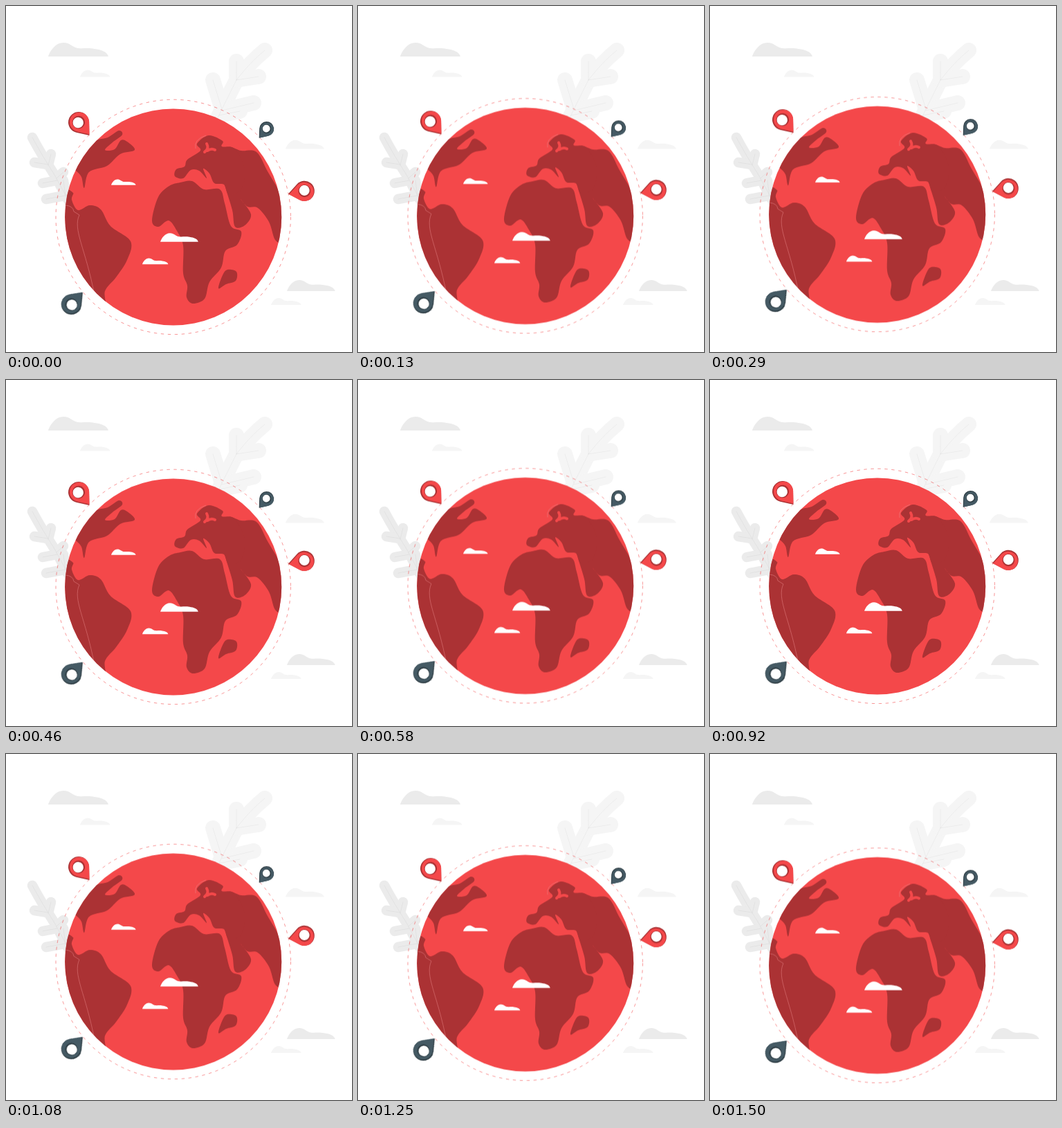
Recreate the animation shown at these times as an HTML page. Size 500 by 500 pixels, loop 1.54 s.

```html
<!DOCTYPE html>
<html lang="en">
<head>
<meta charset="utf-8">
<title>Floating globe</title>
<style>
  html, body { margin: 0; width: 100%; height: 100%; overflow: hidden; background: #fff; }
  svg { display: block; width: 100%; height: 100%; }
  .float { animation: float 1540ms -46ms infinite; }
  /* 19 stepped positions up, 18 down */
  @keyframes float {
    0% { transform: translateY(.54px); animation-timing-function: steps(19); }
    51.35% { transform: translateY(-9.73px); animation-timing-function: steps(1); }
    51.352% { transform: translateY(-9.19px); animation-timing-function: steps(18); }
    100% { transform: translateY(.54px); }
  }
  .red { --main: #f4484a; --shade: #ab3234; }
  .slate { --main: #455a64; --shade: #303f46; }
  .pale { --tint: #f5f5f5; fill: var(--tint); }
  .grey { --tint: #ebebeb; fill: var(--tint); }
  .leaf path { fill: none; stroke: var(--tint); stroke-linecap: round; stroke-linejoin: round; }
  .leaf .vein { stroke: #000; stroke-opacity: .06; stroke-width: .7; }
  .land { fill: #ab3234; }
  .sea { fill: none; stroke: #f4484a; stroke-width: 4; stroke-linecap: round; }
  .coast { fill: none; stroke: #e8898a; stroke-width: .5; }
</style>
</head>
<body>
<svg viewBox="0 0 500 500">
  <defs>
    <path id="cloud" d="M0 0C3-9 11-20 22-20C32-20 35-13 43-12C51-11 57-13 67-11C77-9.500 85-7 87 0Z"/>
    <path id="drop" d="M24.500 0L9.200 11.900A15 15 0 1 1 9.200-11.900Z"/>
    <g id="pin">
      <use href="#drop" fill="var(--shade)"/>
      <use href="#drop" fill="var(--main)" transform="translate(.4 -1) scale(.94)"/>
      <circle r="9.200" fill="var(--shade)"/>
      <circle cy=".9" r="7.700" fill="#fff"/>
    </g>
    <circle id="ball" cx="241.700" cy="304.900" r="156.500"/>
    <clipPath id="disc"><use href="#ball"/></clipPath>
  </defs>

  <use href="#cloud" class="grey" transform="translate(61 73)"/>
  <use href="#cloud" class="pale" transform="translate(107 102.500) scale(.5)"/>
  <use href="#cloud" class="pale" transform="translate(404 206.500) scale(.64)"/>
  <use href="#cloud" class="grey" transform="translate(406 412) scale(.8)"/>
  <use href="#cloud" class="pale" transform="translate(383 432) scale(.5)"/>

  <g id="oak" class="leaf pale"></g>
  <g id="fern" class="leaf grey"></g>

  <g class="float">
    <circle cx="241.700" cy="304.900" r="169.700" fill="none" stroke="#f4484a" stroke-width=".6" stroke-dasharray="4.400 5.600"/>
    <use href="#ball" fill="#f4484a"/>
    <g clip-path="url(#disc)">
      <!-- Americas -->
      <path class="land" data-pts="126,197 147,190 163,180 168,186 154,197 143,208 157,207 166,194 175,196 186,208 165,214 146,231 120,240 113,263 109,247 101,238 90,230"/>
      <path class="land" data-pts="84,274 97,270 95,280 104,295 121,288 137,294 151,318 180,340 175,367 159,392 143,412 140,440 70,360"/>
      <path class="coast" d="M86 288Q97 289 98 297L106 302C96 323 115 350 128 418"/>
      <!-- Asia and Europe -->
      <path class="land" data-pts="320,205 340,209 362,211 378,239 394,267 404,300 400,338 389,338 380,312 364,292 349,290 339,279 354,301 345,317 331,319 327,295 317,262 310,235"/>
      <path class="land" data-pts="244,246 246,236 258,232 262,222 281,209 276,199 293,187 313,195 312,203 330,206 345,235 340,265 322,272 315,258 301,256 294,242 285,235 290,249 279,238 267,237 256,249"/>
      <path class="sea" d="M287 211Q294 206 290 199M291 209Q297 205 302 208"/>
      <path class="coast" d="M274 206Q271 193 289 187"/>
      <!-- Africa -->
      <path class="land" data-pts="220,276 236,260 252,255 269,253 286,265 309,265 316,285 325,318 340,326 334,345 317,354 311,378 294,399 287,423 270,430 261,421 262,404 256,386 256,346 247,325 235,310 220,319 211,310"/>
      <path class="land" data-pts="320,381 333,384 332,397 318,402 307,408 313,389"/>
    </g>
    <g fill="#fff">
      <use href="#cloud" transform="translate(152 258.800) scale(.41)"/>
      <use href="#cloud" transform="translate(223 340.800) scale(.63)"/>
      <use href="#cloud" transform="translate(197 373.200) scale(.43)"/>
    </g>
    <use href="#pin" class="red" transform="translate(105 168) rotate(51)"/>
    <use href="#pin" class="red" transform="translate(431.300 267.300) rotate(170) scale(.97)"/>
    <use href="#pin" class="slate" transform="translate(376.700 177.500) rotate(130) scale(.7)"/>
    <use href="#pin" class="slate" transform="translate(94.500 431.300) rotate(-47) scale(.98)"/>
  </g>
</svg>
<script>
  // Closed Catmull-Rom curve through the points
  function smooth(pts) {
    const n = pts.length;
    const at = i => pts[(i + n) % n];
    let d = "M" + pts[0];
    for (let i = 0; i < n; i++) {
      const [a, b, c, e] = [at(i - 1), at(i), at(i + 1), at(i + 2)];
      const c1 = b.map((v, k) => v + (c[k] - a[k]) / 6);
      const c2 = c.map((v, k) => v - (e[k] - b[k]) / 6);
      d += `C${c1} ${c2} ${c}`;
    }
    return d + "Z";
  }
  for (const path of document.querySelectorAll("[data-pts]")) {
    path.setAttribute("d", smooth(path.dataset.pts.split(" ").map(p => p.split(",").map(Number))));
  }

  // Each rib is a broad rounded lobe with a thin vein along it
  function leaf(id, width, ribs) {
    const lobes = ribs.map(d => `<path stroke-width="${width}" d="${d}"/>`);
    document.getElementById(id).innerHTML =
      lobes.join("") + `<path class="vein" d="${ribs.join("")}"/>`;
  }
  leaf("oak", 22, [
    "M303 168L312 149L333 107Q352 82 374 64",
    "M333 107V80",
    "M333 107L365 102",
    "M312 149L299 107",
    "M312 151L358 140",
    "M308 158L338 152"
  ]);
  leaf("fern", 14.5, [
    "M92 284L70 244Q52 216 38 190",
    "M61 230L65 214",
    "M60 229L41 226",
    "M73 249L83 240",
    "M74 252L53 256",
    "M85 274L58 279",
    "M86 276L83 252"
  ]);
</script>
</body>
</html>
```
